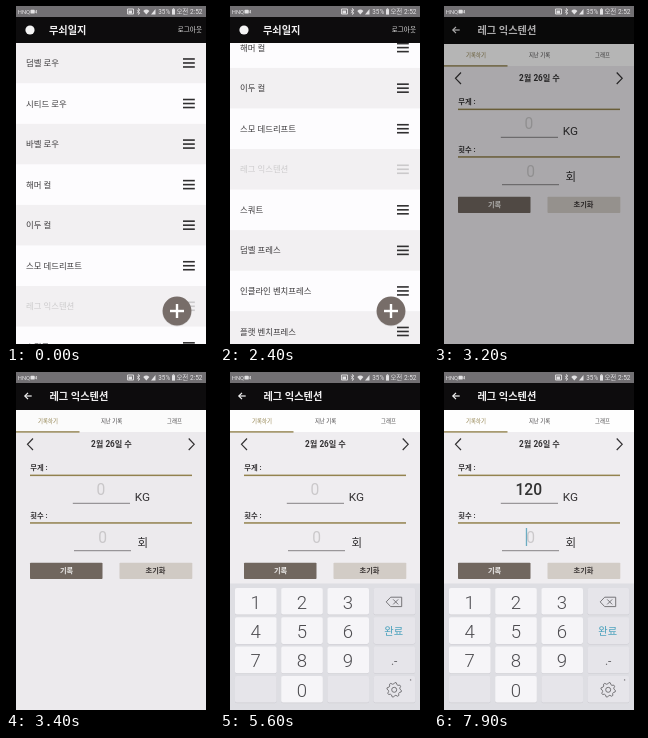
Write an HTML page with a canvas that moves like this. It is 208x338 px and loops after 8000 ms.

```html
<!DOCTYPE html>
<html lang="ko">
<head>
<meta charset="utf-8">
<title>운동 기록</title>
<style>
html, body { margin: 0; width: 100%; height: 100%; overflow: hidden; background: #000; }
canvas { display: block; width: 208px; height: 338px; }
</style>
</head>
<body>
<canvas id="stage"></canvas>
<script>
const W = 208, H = 338, LOOP = 8000, STEP = 100;
const LEFT = 10, RIGHT = 200, STATUS_H = 11, BAR_BOTTOM = 37;
const ROW_H = 40.55, PRESSED_ROW = 6;
const FONT = 'Roboto, "Noto Sans CJK KR", "Noto Sans CJK", sans-serif';
const exercises = ['덤벨 로우', '시티드 로우', '바벨 로우', '해머 컬', '이두 컬', '스모 데드리프트',
  '레그 익스텐션', '스쿼트', '덤벨 프레스', '인클라인 벤치프레스', '플랫 벤치프레스'];

const canvas = document.getElementById('stage');
const ctx = canvas.getContext('2d');
const ratio = window.devicePixelRatio || 1;
canvas.width = W * ratio;
canvas.height = H * ratio;

function rect(x, y, w, h, color) {
  ctx.fillStyle = color;
  ctx.fillRect(x, y, w, h);
}

function round(x, y, w, h, r, color) {
  ctx.fillStyle = color;
  ctx.beginPath();
  ctx.roundRect(x, y, w, h, r);
  ctx.fill();
}

function disc(x, y, r, color) {
  ctx.fillStyle = color;
  ctx.beginPath();
  ctx.arc(x, y, r, 0, Math.PI * 2);
  ctx.fill();
}

function line(points, color, width, close) {
  ctx.strokeStyle = color;
  ctx.lineWidth = width;
  ctx.beginPath();
  points.forEach(([x, y]) => ctx.lineTo(x, y));
  if (close) ctx.closePath();
  ctx.stroke();
}

// y is the visual middle of the glyphs
function text(str, x, y, size, color, { align = 'left', weight = 400 } = {}) {
  ctx.font = `${weight} ${size}px ${FONT}`;
  ctx.textAlign = align;
  ctx.fillStyle = color;
  ctx.fillText(str, x, y + size * 0.37);
}

function faded(alpha, draw) {
  ctx.save();
  ctx.globalAlpha *= alpha;
  draw();
  ctx.restore();
}

// linear interpolation through [time, value] pairs
function track(t, keys) {
  if (t <= keys[0][0]) return keys[0][1];
  for (let i = 1; i < keys.length; i++) {
    const [t0, v0] = keys[i - 1], [t1, v1] = keys[i];
    if (t < t1) return v0 + (v1 - v0) * (t - t0) / (t1 - t0);
  }
  return keys[keys.length - 1][1];
}

function smooth(t, from, to) {
  const p = Math.min(1, Math.max(0, (t - from) / (to - from)));
  return p * p * (3 - 2 * p);
}

function drawStatus() {
  const c = '#e2e1e3';
  rect(LEFT, 0, RIGHT - LEFT, STATUS_H, '#727073');
  text('HNQ', 11.8, 5.5, 5.8, c);
  round(24.5, 3.8, 4.2, 3.8, 0.7, c);
  line([[29, 5.7], [30.5, 4.2], [30.5, 7.2]], c, 0.7, true);
  line([[121.5, 3], [127.5, 3], [127.5, 8], [121.5, 8]], c, 0.9, true);
  rect(122.5, 4.5, 3.5, 3, c);
  line([[130.8, 4], [134, 7], [132.4, 8.6], [132.4, 2.4], [134, 4], [130.8, 7]], c, 0.7);
  ctx.fillStyle = c;
  ctx.beginPath();
  ctx.moveTo(140.3, 8.4);
  ctx.arc(140.3, 8.4, 4.6, -2.3, -0.84);
  ctx.fill();
  ctx.beginPath();
  ctx.moveTo(145, 8.4);
  ctx.lineTo(149.5, 8.4);
  ctx.lineTo(149.5, 3);
  ctx.fill();
  text('35%', 152.3, 5.6, 6.3, c);
  rect(166, 3.2, 3, 5.4, c);
  rect(166.8, 2.3, 1.4, 1, c);
  text('오전 2:52', 196.5, 5.6, 6.5, c, { align: 'right' });
}

function drawBar(title, x) {
  rect(LEFT, STATUS_H, RIGHT - LEFT, BAR_BOTTOM - STATUS_H, '#0d0c0d');
  text(title, x, 24, 10.2, '#f0eff0', { weight: 700 });
}

function drawList(t) {
  const scroll = 136 * smooth(t, 600, 1600) + smooth(t, 1500, 1800);
  const pressed = track(t, [[600, 0.2], [900, 1], [2100, 1], [2400, 0.2]]);
  rect(LEFT, BAR_BOTTOM, RIGHT - LEFT, H, '#fdfcfe');
  exercises.forEach((name, i) => {
    const top = 36.7 + i * ROW_H - scroll, mid = top + ROW_H / 2;
    if (i % 2 === 0) rect(LEFT, top, RIGHT - LEFT, ROW_H, '#f2f0f2');
    faded(i === PRESSED_ROW ? pressed : 1, () => {
      text(name, 20, mid, 8.4, '#3c3a3c');
      for (const dy of [-4, 0, 4]) rect(177, mid + dy - 0.8, 11.8, 1.6, '#302f30');
    });
  });
  const barAlpha = track(t, [[600, 0], [700, 1], [2100, 1], [2400, 0]]);
  faded(barAlpha, () => rect(198, 36 + scroll * 0.688, 2, 203, '#b4b3b5'));

  disc(171, 305.8, 14.6, 'rgba(0,0,0,0.1)');
  disc(171, 305, 14.4, '#776d69');
  rect(164, 303.8, 14, 2.4, '#fff');
  rect(169.8, 298, 2.4, 14, '#fff');

  drawBar('무쇠일지', 43);
  disc(24, 24, 4.6, '#f4f4f4');
  text('로그아웃', 196, 24, 6.6, '#dedede', { align: 'right' });
}

function drawField(y, x, value, cursor) {
  const size = 15.6;
  text(value || '0', x, y, size, value ? '#333' : '#cbc9cb', { align: 'center', weight: value ? 500 : 400 });
  if (cursor > 0) {
    const half = ctx.measureText(value || '0').width / 2;
    const cx = value ? x + half + 1 : x - half + 0.2;
    faded(cursor, () => rect(cx - 0.7, y - 9, 1.3, 18, '#6cacc2'));
  }
}

function drawForm(t) {
  const dark = '#343234', gold = '#93834f', center = { align: 'center' };
  const strong = { weight: 700 }, strongCenter = { align: 'center', weight: 700 };
  rect(LEFT, BAR_BOTTOM, RIGHT - LEFT, H, '#efedf0');
  drawBar('레그 익스텐션', 43.5);
  rect(LEFT, BAR_BOTTOM, RIGHT - LEFT, 1, '#0d0c0d');
  line([[22, 20.8], [18.8, 24], [22, 27.2]], '#f4f4f4', 1.2);
  line([[19, 24], [25.7, 24]], '#f4f4f4', 1.2);

  rect(LEFT, BAR_BOTTOM + 1, RIGHT - LEFT, 22, '#fefefe');
  text('기록하기', 42, 49, 5.4, gold, { align: 'center', weight: 500 });
  text('지난 기록', 105.5, 49, 5.4, '#454345', center);
  text('그래프', 168.5, 49, 5.4, '#454345', center);
  rect(LEFT, 59.2, 63.5, 1.4, gold);

  line([[27, 66.5], [21.5, 72.3], [27, 78]], dark, 1.2);
  line([[182.7, 66.5], [188.2, 72.3], [182.7, 78]], dark, 1.2);
  text('2월 26일 수', 105.5, 72.3, 8.2, dark, strongCenter);

  text('무게 :', 24.3, 95.3, 7.3, dark, strong);
  rect(24, 102.6, 162, 1.5, gold);
  text('횟수 :', 24.3, 143.3, 7.3, dark, strong);
  rect(24, 150.2, 162, 1.5, gold);

  const typed = t >= 7000 ? '120' : t >= 6600 ? '12' : t >= 6200 ? '1' : '';
  const blink = (t >= 4900 && t < 5400) || (t >= 6200 && t < 7500) ? 1 : 0;
  drawField(117.3, 94.8, typed, blink);
  drawField(165, 96.7, '', track(t, [[7700, 0], [7900, 1]]));
  rect(66.8, 130.8, 57.2, 1, '#858385');
  rect(68, 178.2, 57, 1, '#858385');
  text('KG', 128.8, 124.7, 11.8, dark);
  text('회', 131.5, 170.8, 11.5, dark, { weight: 500 });

  round(24, 190.8, 72.5, 16.2, 0.8, '#71675f');
  round(113.5, 190.8, 72.8, 16.2, 0.8, '#d2ccc6');
  text('기록', 60.5, 198.8, 7.2, '#f1efee', strongCenter);
  text('초기화', 149.5, 198.8, 7.2, '#3b3635', strongCenter);
}

const presses = {
  1: [[5800, 0], [5900, 0.7], [6000, 1], [6100, 1], [6300, 0]],
  2: [[6300, 0], [6400, 1], [6500, 1], [6700, 0]],
  0: [[6700, 0], [6800, 1], [6900, 1], [7000, 0.8], [7300, 0]]
};

function drawKeyboard(t) {
  const p = Math.min(1, Math.max(0, (t - 4400) / 600));
  if (p === 0) return;
  const labels = ['1', '2', '3', 'del', '4', '5', '6', '완료', '7', '8', '9', '.-', '', '0', '', 'gear'];
  const ink = '#6a696d';
  ctx.save();
  ctx.translate(0, 127 * (1 - p) ** 3);
  rect(LEFT, 211.5, RIGHT - LEFT, 127, '#dedee3');
  labels.forEach((label, i) => {
    const x = 15 + (i % 4) * 46.2, y = 216 + Math.floor(i / 4) * 29.3;
    const cx = x + 20.6, cy = y + 13.9, isDigit = /^\d$/.test(label);
    round(x, y + 0.6, 41.6, 26.7, 1.8, '#cfced4');
    round(x, y, 41.6, 26.6, 1.8, isDigit ? '#f6f5f8' : '#e6e5ea');
    if (presses[label]) faded(track(t, presses[label]), () => round(x, y, 41.6, 26.6, 1.8, '#c6cfd7'));
    if (isDigit) {
      text(label, cx, cy, 18.6, '#4d4c50', { align: 'center', weight: 300 });
    } else if (label === 'del') {
      line([[cx - 8, cy], [cx - 3.5, cy - 4.7], [cx + 7.5, cy - 4.7], [cx + 7.5, cy + 4.7], [cx - 3.5, cy + 4.7]], ink, 0.9, true);
      line([[cx - 1, cy - 2.5], [cx + 4, cy + 2.5]], ink, 0.9);
      line([[cx + 4, cy - 2.5], [cx - 1, cy + 2.5]], ink, 0.9);
    } else if (label === 'gear') {
      const rim = Array.from({ length: 32 }, (_, k) => {
        const a = (k + 0.5) * Math.PI / 16, r = k % 4 < 2 ? 7.3 : 5.8;
        return [cx + r * Math.cos(a), cy + r * Math.sin(a)];
      });
      line(rim, ink, 0.9, true);
      ctx.beginPath();
      ctx.arc(cx, cy, 2.5, 0, Math.PI * 2);
      ctx.stroke();
      disc(x + 37, y + 4, 0.7, ink);
    } else if (label === '완료') {
      text(label, cx - 0.5, cy, 10.2, '#459fbb', { align: 'center', weight: 500 });
    } else {
      text(label, cx, cy, 12, ink, { align: 'center' });
    }
  });
  ctx.restore();
}

function render(t) {
  ctx.setTransform(ratio, 0, 0, ratio, 0, 0);
  rect(0, 0, W, H, '#000');
  ctx.save();
  ctx.beginPath();
  ctx.rect(LEFT, 0, RIGHT - LEFT, H);
  ctx.clip();
  if (t < 2900) drawList(t);
  if (t >= 2700) {
    faded(track(t, [[2600, 0], [2700, 0.4], [2800, 0.85], [2900, 1]]), () => drawForm(t));
    const shade = track(t, [[2600, 0], [2900, 0.59], [3000, 0.57], [3400, 0.01], [3500, 0]]);
    rect(LEFT, STATUS_H, RIGHT - LEFT, H, `rgba(0,0,0,${shade})`);
    drawKeyboard(t);
  }
  drawStatus();
  ctx.restore();
}

const start = performance.now();
function tick() {
  const t = (performance.now() - start) % LOOP;
  render(Math.floor(t / STEP) * STEP);
  requestAnimationFrame(tick);
}
tick();
</script>
</body>
</html>
```
